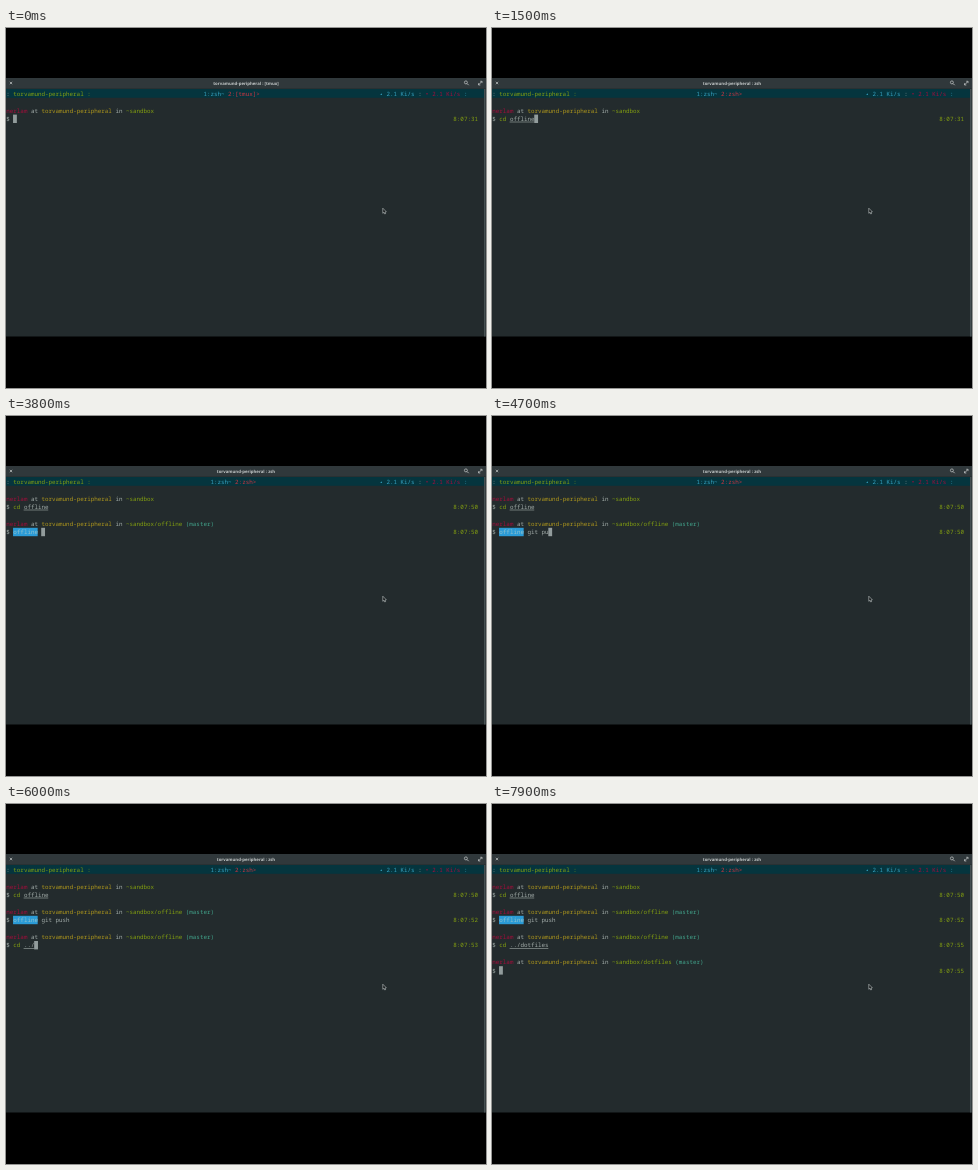
An HTML page with a canvas for the animation above (8000 ms loop, 480 px wide and 360 px high).

```html
<!DOCTYPE html>
<html lang="en">
<head>
<meta charset="utf-8">
<title>Terminal session</title>
<style>
  html, body { margin: 0; width: 100%; height: 100%; overflow: hidden; background: #000; }
  canvas { display: block; }
</style>
</head>
<body>
<canvas id="stage" width="480" height="360"></canvas>
<script>
const ctx = document.getElementById('stage').getContext('2d');
const LOOP = 8000, CELL = 3.52, LINE = 8.4, TOP = 61.4, BLINK = 500;
const USER = 'nerlam', HOST = 'torvamund-peripheral';
const MONO = '5.867px "Noto Sans Mono", "DejaVu Sans Mono", monospace';
const TITLE = 'bold 4.3px "Open Sans", sans-serif';
const C = {
  bg: '#232b2d', bar: '#30383b', status: '#05353e', text: '#a3adaa', green: '#84a010',
  yellow: '#b0981c', cyan: '#42a58c', blue: '#36a3c2', red: '#cf3540', crimson: '#a50d3b',
  alias: '#2b9bd6', aliasText: '#93c3cd', cursor: '#929c9c'
};

// Each shell entry: top row, directory, clock at start and after Enter, branch, keystrokes [ms, text].
const entries = [
  { row: 2, from: 0, dir: '~sandbox', clock: '8:07:31', done: 2200, doneClock: '8:07:50',
    keys: [[200, ''], [500, 'c'], [700, 'cd'], [900, 'cd '], [1000, 'cd o'], [1100, 'cd of'],
           [1300, 'cd off'], [1400, 'cd offli'], [1500, 'cd offline']] },
  { row: 5, from: 2200, dir: '~sandbox/offline', branch: true, clock: '8:07:50', done: 5000, doneClock: '8:07:52',
    keys: [[3000, 'o'], [3100, 'of'], [3300, 'off'], [3400, 'offl'], [3600, 'offlin'], [3700, 'offline'],
           [3800, 'offline '], [4000, 'offline g'], [4200, 'offline gi'], [4300, 'offline git'],
           [4400, 'offline git '], [4600, 'offline git p'], [4700, 'offline git pu'], [4800, 'offline git push']] },
  { row: 8, from: 5100, dir: '~sandbox/offline', branch: true, clock: '8:07:53', done: 7800, doneClock: '8:07:55',
    keys: [[5500, 'c'], [5600, 'cd'], [5700, 'cd '], [5900, 'cd ..'], [6000, 'cd ../'], [6100, 'cd ../'],
           [7000, 'cd ../d'], [7100, 'cd ../do'], [7200, 'cd ../dot'], [7400, 'cd ../dotfiles']] },
  { row: 11, from: 7800, dir: '~sandbox/dotfiles', branch: true, clock: '8:07:55', done: Infinity, keys: [] }
];

function rect(x, y, w, h, color) {
  ctx.fillStyle = color;
  ctx.fillRect(x, y, w, h);
}

// Writes [text, color] spans along one row of the character grid.
function write(col, row, ...spans) {
  ctx.font = MONO;
  ctx.textAlign = 'left';
  for (const [text, color] of spans) {
    ctx.fillStyle = color;
    ctx.fillText(text, col * CELL + 0.3, TOP + row * LINE + 6.3);
    col += text.length;
  }
}

function line(color, width, ...points) {
  ctx.strokeStyle = color;
  ctx.lineWidth = width;
  ctx.beginPath();
  points.forEach(([x, y], i) => i ? ctx.lineTo(x, y) : ctx.moveTo(x, y));
  ctx.stroke();
}

function drawWindow(program) {
  const icon = '#c6caca';
  rect(0, 0, 480, 360, '#000');
  rect(0, 50, 480, 258.5, C.bg);
  rect(0, 50, 480, 10.5, C.bar);
  rect(478, 61, 1.5, 247.5, '#465052');

  ctx.font = TITLE;
  ctx.textAlign = 'center';
  ctx.fillStyle = '#c3c8c8';
  ctx.fillText(`${HOST} : ${program}`, 240, 56.7);

  line(icon, 0.7, [3.8, 53.8], [6.2, 56.2]);
  line(icon, 0.7, [6.2, 53.8], [3.8, 56.2]);
  ctx.beginPath();
  ctx.arc(459.9, 54.4, 1.5, 0, 7);
  ctx.stroke();
  line(icon, 0.8, [461, 55.5], [462.7, 57.2]);
  line(icon, 0.8, [472.7, 56.8], [475.8, 53.5]);
  line(icon, 0.7, [474.2, 53.3], [476, 53.3], [476, 55.1]);
  line(icon, 0.7, [472.5, 55.2], [472.5, 57], [474.3, 57]);
}

function drawStatus(program) {
  rect(0, 61, 478, 8.8, C.status);
  write(0, 0, [': ', C.text], [`${HOST} :`, C.green]);
  write(program === 'zsh' ? 58 : 56, 0, ['1:zsh~ ', C.blue], [`2:${program}>`, C.red]);
  write(106, 0, ['▴', C.blue], [' 2.1 Ki/s ', C.blue], [': ', C.text],
    ['▾', C.crimson], [' 2.1 Ki/s ', C.crimson], [':', C.blue]);
}

function drawCommand(text, row) {
  const [name] = text.split(' ');
  const rest = text.slice(name.length);
  if (name === 'offline') {
    rect(2 * CELL, TOP + row * LINE, 7 * CELL, LINE, C.alias);
    write(2, row, [name, C.aliasText], [rest, C.text]);
    return;
  }
  write(2, row, [name, name[0] === 'c' ? C.green : C.red], [rest, C.text]);
  if (rest.length > 1) {
    rect(5 * CELL, TOP + row * LINE + 7.1, (rest.length - 1) * CELL, 0.6, C.text);
  }
}

function drawCursor(col, row) {
  rect(col * CELL, TOP + row * LINE, CELL + 0.3, LINE, C.cursor);
}

function drawEntry(entry, t) {
  const { row, dir, branch, from, done } = entry;
  write(0, row, [USER, C.crimson], [' at ', C.text], [HOST, C.yellow], [' in ', C.text],
    [dir, C.green], [branch ? ' (master)' : '', C.cyan]);
  write(0, row + 1, ['$', C.text]);
  write(127, row + 1, [t < done ? entry.clock : entry.doneClock, C.green]);

  const [typedAt, text] = entry.keys.filter(([at]) => at <= t).pop() || [from, ''];
  const idle = t - typedAt;
  if (t < done && idle % (2 * BLINK) < BLINK) drawCursor(2 + text.length, row + 1);
  drawCommand(text, row + 1);
}

function drawPointer() {
  ctx.beginPath();
  [[376.8, 180.2], [376.8, 185.3], [378, 184.3], [378.8, 186], [379.6, 185.6], [378.9, 184], [380.3, 183.8]]
    .forEach(([x, y]) => ctx.lineTo(x, y));
  ctx.closePath();
  ctx.fillStyle = '#15191a';
  ctx.fill();
  ctx.strokeStyle = '#c5cbcb';
  ctx.lineWidth = 0.6;
  ctx.stroke();
}

function draw(t) {
  const program = t < 200 ? '[tmux]' : 'zsh';
  drawWindow(program);
  drawStatus(program);
  entries.filter(entry => t >= entry.from).forEach(entry => drawEntry(entry, t));
  if (t >= 5000 && t < 5100) drawCursor(0, 7);
  drawPointer();
}

ctx.textRendering = 'geometricPrecision';
const start = performance.now();
function tick() {
  draw((performance.now() - start) % LOOP);
  requestAnimationFrame(tick);
}
tick();
</script>
</body>
</html>
```
